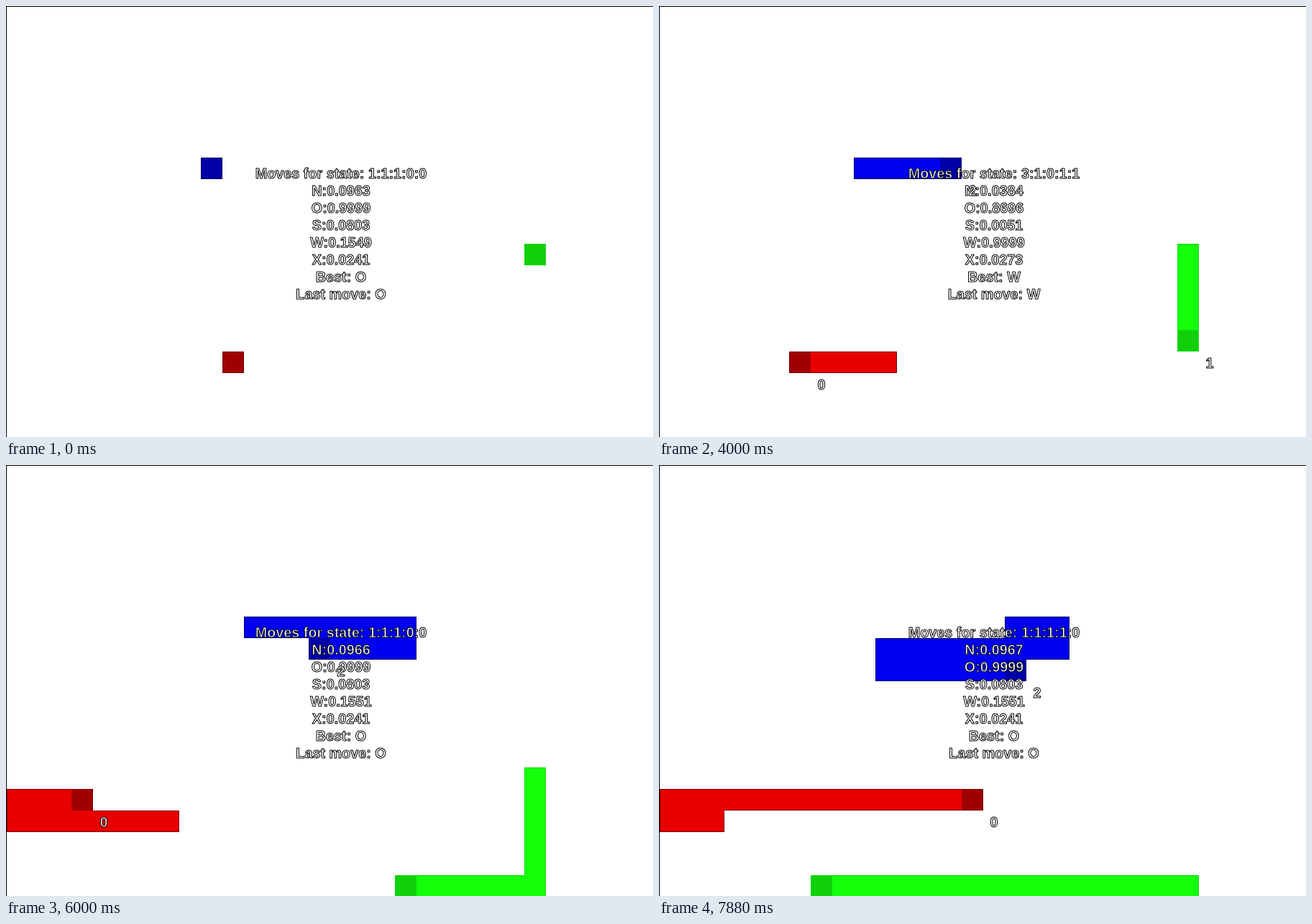
Recreate the animation shown at these times as an HTML page with a canvas. Size 900 by 600 pixels, loop 8 s.

```html
<!DOCTYPE html>
<html lang="en">
<head>
<meta charset="utf-8">
<title>Three snakes</title>
<style>
  html, body { margin: 0; width: 100%; height: 100%; overflow: hidden; background: #fff; }
  canvas { display: block; }
</style>
</head>
<body>
<canvas id="stage" width="900" height="600"></canvas>
<script>
const ctx = document.getElementById('stage').getContext('2d');
const LOOP = 8000, TICK = 125;           // loop length and picture rate, ms
const FIRST_MOVE = 3440, MOVE = 550 / 3; // start and pace of the game, ms
const CELL = 30;
const DIRS = { N: [0, -1], O: [1, 0], S: [0, 1], W: [-1, 0] };

// Walk runs such as "W10 N1" and list every cell visited.
function walk(x, y, runs) {
  const cells = [[x, y]];
  for (const run of runs.split(' ')) {
    const [dx, dy] = DIRS[run[0]];
    for (let i = +run.slice(1); i > 0; i--) cells.push([x += dx, y += dy]);
  }
  return cells;
}

// "grow" is the number of moves before the tail starts to follow.
const snakes = [
  { label: '0', path: walk(10, 16, 'W10 N1 O14'), grow: 8, body: '#e80000', head: '#a00000', edge: '#780000' },
  { label: '1', path: walk(24, 11, 'S8 W17'), grow: 8, body: '#14ff0a', head: '#10d00a', edge: '#12dc0c' },
  { label: '2', path: walk(9, 7, 'O9 S1 W8 S1 O6'), grow: 10, body: '#0000f0', head: '#0000a8', edge: '#000060' }
];

// [from move, state, N, O, S, W, X, best, last]
const panels = [
  [0, '1:1:1:0:0', '0.0963', '0.9999', '0.0803', '0.1549', '0.0241', 'O', 'O'],
  [1, '3:1:0:1:1', '0.0384', '0.8696', '0.0051', '0.9999', '0.0273', 'W', 'W'],
  [10, '3:1:0:1:0', '0.9999', '0.8696', '0.0051', '0.0384', '0.0273', 'N', 'W'],
  [11, '0:1:1:0:0', '0.0966', '0.9999', '0.0803', '0.1551', '0.0241', 'O', 'N'],
  [12, '1:1:1:0:0', '0.0966', '0.9999', '0.0803', '0.1551', '0.0241', 'O', 'O'],
  [18, '1:1:1:1:0', '0.0967', '0.9999', '0.0803', '0.1551', '0.0241', 'O', 'O']
];

function drawSnake({ path, grow, body, head, edge }, move) {
  const tail = Math.max(0, Math.floor((move - grow) / 2));
  const cells = path.slice(tail, move + 1);
  const taken = new Set(cells.map(String));
  const gap = (x, y) => taken.has(x + ',' + y) ? 0 : 1;
  cells.forEach(([x, y], i) => {
    const px = x * CELL + 1, py = y * CELL + 1;
    const l = gap(x - 1, y), r = gap(x + 1, y), t = gap(x, y - 1), b = gap(x, y + 1);
    ctx.fillStyle = edge;
    ctx.fillRect(px, py, CELL, CELL);
    ctx.fillStyle = i === cells.length - 1 ? head : body;
    ctx.fillRect(px + l, py + t, CELL - l - r, CELL - t - b);
  });
}

function drawText(text, x, y) {
  ctx.fillStyle = '#fff';
  ctx.fillText(text, x, y);
  ctx.strokeStyle = '#000';
  ctx.strokeText(text, x, y);
}

function drawPanel(move) {
  const [, state, n, o, s, w, x, best, last] = panels.filter(p => p[0] <= move).pop();
  const lines = [
    'Moves for state: ' + state,
    'N:' + n, 'O:' + o, 'S:' + s, 'W:' + w, 'X:' + x,
    'Best: ' + best, 'Last move: ' + last
  ];
  lines.forEach((line, i) => drawText(line, 466, 239.5 + i * 24));
}

function draw(time) {
  const shown = Math.floor(time % LOOP / TICK) * TICK;
  const move = Math.max(0, Math.floor((shown - FIRST_MOVE) / MOVE) + 1);

  ctx.fillStyle = '#fff';
  ctx.fillRect(0, 0, 900, 600);
  snakes.forEach(snake => drawSnake(snake, move));
  ctx.fillStyle = '#000';
  ctx.fillRect(0, 0, 900, 1);
  ctx.fillRect(0, 0, 1, 600);

  ctx.font = 'bold 19.8px "Liberation Sans", Arial, sans-serif';
  ctx.textAlign = 'center';
  ctx.lineJoin = 'round';
  ctx.lineWidth = 1;
  drawPanel(move);
  if (move > 0) {
    for (const { label, path } of snakes) {
      const [x, y] = path[move];
      drawText(label, x * CELL + 46, y * CELL + 53.5);
    }
  }
}

const start = performance.now();
function loop() {
  draw(performance.now() - start);
  requestAnimationFrame(loop);
}
loop();
</script>
</body>
</html>
```
